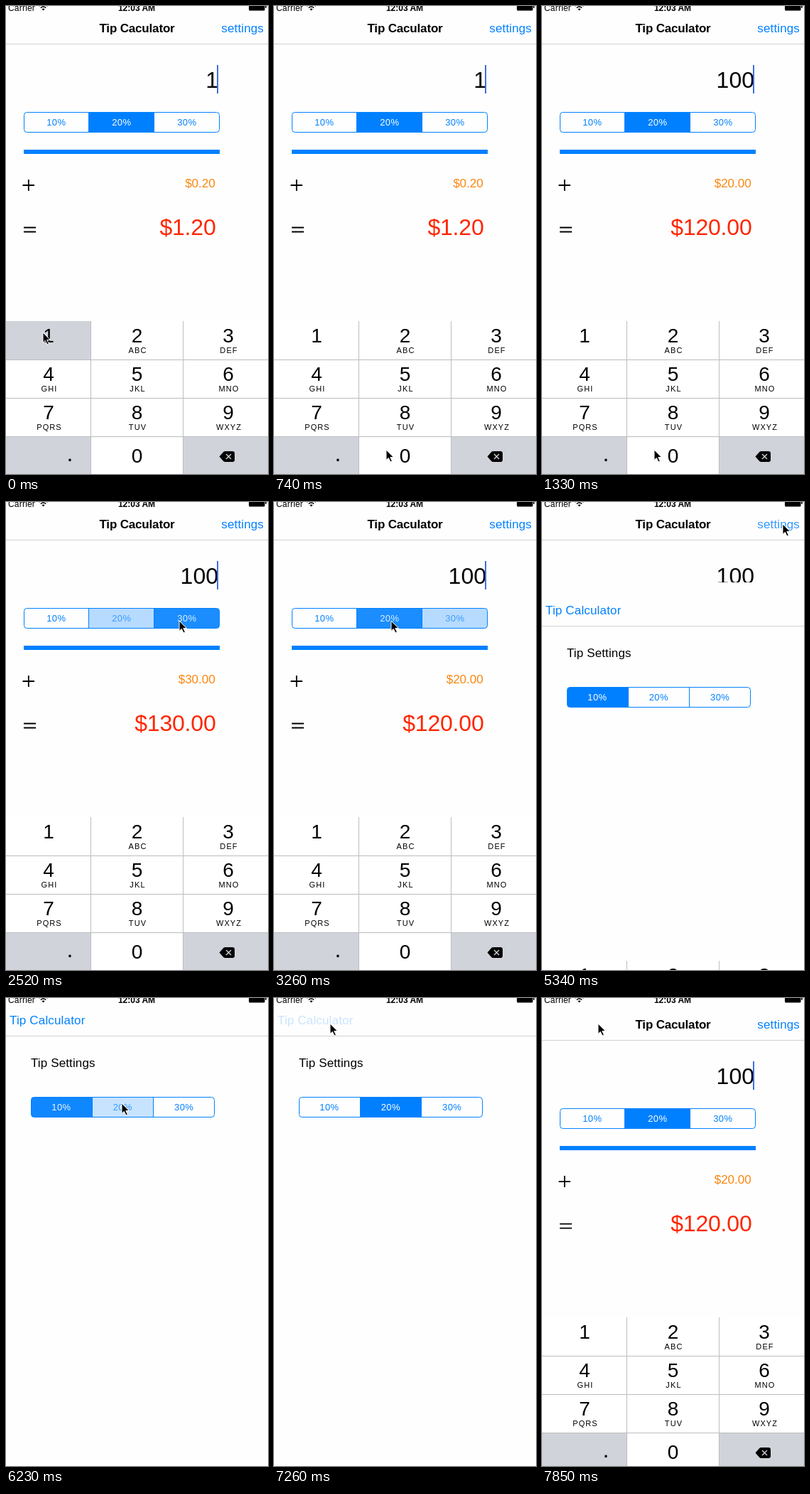
An HTML page that plays this animation: 369 by 658 pixels, repeating every 8 s.

```html
<!DOCTYPE html>
<html lang="en">
<head>
<meta charset="utf-8">
<title>Tip calculator</title>
<style>
html, body { margin: 0; width: 100%; height: 100%; overflow: hidden; background: #fefefe; }
svg { display: block; width: 369px; height: 658px; font-family: "Liberation Sans", Arial, sans-serif; }
text { white-space: pre; }
</style>
</head>
<body>
<svg id="stage" viewBox="0 0 369 658"></svg>
<script>
const LOOP = 8000, STEPS = 54;
const BLUE = '#0080ff', GRAY = '#d0d3da', PAPER = '#fefefe';
const stage = document.getElementById('stage');

function set(node, attrs) {
  for (const name in attrs) node.setAttribute(name, attrs[name]);
}
function el(parent, tag, attrs = {}, content) {
  const node = document.createElementNS('http://www.w3.org/2000/svg', tag);
  set(node, attrs);
  if (content !== undefined) node.textContent = content;
  parent.append(node);
  return node;
}
const group = parent => el(parent, 'g');
const rect = (parent, x, y, width, height, fill, more) =>
  el(parent, 'rect', { x, y, width, height, fill, ...more });
const path = (parent, d, more) => el(parent, 'path', { d, fill: 'none', ...more });
const text = (parent, x, y, size, content, more) =>
  el(parent, 'text', { x, y, 'font-size': size, ...more }, content);
const MID = { 'text-anchor': 'middle' }, END = { 'text-anchor': 'end' };
const shift = (node, x, y) => set(node, { transform: `translate(${x.toFixed(2)} ${y.toFixed(2)})` });

// Segmented control; the returned function takes the fill strength of each part.
function segments(parent, id, x, y, width) {
  const box = { x: x + .5, y: y + .5, width: width - 1, height: 28, rx: 4 };
  el(el(parent, 'clipPath', { id }), 'rect', box);
  const fills = el(parent, 'g', { 'clip-path': `url(#${id})` });
  const edge = i => x + Math.floor(width * i / 3 - .3 * (i % 3 > 0));
  const parts = ['10%', '20%', '30%'].map((label, i) => [
    rect(fills, edge(i), y, edge(i + 1) - edge(i) + .5, 29, BLUE),
    text(parent, x + width * (i + .5) / 3 - .2, y + 18.7, 13, label, { ...MID, 'letter-spacing': .4 })
  ]);
  el(parent, 'rect', { ...box, fill: 'none', stroke: BLUE });
  path(parent, `M${edge(1) + .5} ${y}v29M${edge(2) + .5} ${y}v29`, { stroke: BLUE });
  return levelOf => parts.forEach(([fill, label], i) => {
    const a = levelOf(i);
    set(fill, { opacity: a });
    set(label, { fill: a > .5 ? '#fff' : BLUE, opacity: 1 - 1.6 * a * (1 - a) });
  });
}

function backdrop(parent) {
  rect(parent, 0, -8, 369, 674, PAPER);
  rect(parent, 0, 53, 369, 1, '#d2d2d2');
}

// Calculator view
const main = group(stage);
backdrop(main);
text(main, 184.5, 37, 17, 'Tip Caculator', { ...MID, 'font-weight': 700, 'letter-spacing': -.17 });
const settingsLink = text(main, 303.3, 37, 17, 'settings', { fill: BLUE, 'letter-spacing': .14 });
const bill = text(main, 299, 115, 32, '', END);
const caret = rect(main, 297, 83, 2, 40, '#3f6fdc');
const paintTip = segments(main, 'tipClip', 25, 149, 276);
rect(main, 25, 202, 276, 6, BLUE);
path(main, 'M23.5 252h16.5M31.8 244v16M25 311.5h17M25 317.5h17', { stroke: '#000', 'stroke-width': 1.8 });
const tip = text(main, 294.7, 255, 17, '', { ...END, fill: '#fb850c' });
const total = text(main, 295.5, 322, 32, '', { ...END, fill: '#ff2600', 'letter-spacing': -.2 });

// Settings view
const prefs = group(stage);
backdrop(prefs);
const backLink = text(prefs, 5, 37, 17, 'Tip Calculator', { fill: BLUE, 'letter-spacing': .16 });
text(prefs, 35, 97, 17, 'Tip Settings', { 'letter-spacing': .12 });
const paintPrefs = segments(prefs, 'prefsClip', 35, 139, 259);

// Keypad
const pad = group(stage);
rect(pad, 0, 443, 369, 216, '#fff');
rect(pad, 0, 605, 119, 54, GRAY);
rect(pad, 250, 605, 119, 54, GRAY);
const keyOne = rect(pad, 0, 443, 119, 54, GRAY);
const keyZero = rect(pad, 120, 605, 129, 54, GRAY);
path(pad, 'M119.5 443v216M249.5 443v216M0 497.5h369M0 551.5h369M0 605.5h369', { stroke: '#bcbdc0' });
['', 'ABC', 'DEF', 'GHI', 'JKL', 'MNO', 'PQRS', 'TUV', 'WXYZ'].forEach((letters, i) => {
  const x = 60 + 126.5 * (i % 3) - (i % 3 === 1 ? 2 : 0), y = 472.7 + 54 * Math.floor(i / 3);
  text(pad, x, y, 28, i + 1, MID);
  text(pad, x + 1, y + 15, 11, letters, { ...MID, 'letter-spacing': 1.1 });
});
text(pad, 184.5, 642, 28, '0', MID);
text(pad, 90, 639.5, 32, '.', MID);
path(pad, 'M300.5 633.5L306 627.2Q307 626 309 626H319Q322 626 322 629V638Q322 641 319 641H309Q307 641 306 639.8Z', { fill: '#000' });
path(pad, 'M310 630l7 7M317 630l-7 7', { stroke: GRAY, 'stroke-width': 1.4 });

// Status bar
const status = group(stage);
text(status, 3, 6.5, 12, 'Carrier', { 'letter-spacing': .2 });
text(status, 184, 6.5, 12, '12:03 AM', { ...MID, 'font-weight': 700 });
path(status, 'M46.5 .2Q52.5 -4.5 58.5 .2M48.8 2.6Q52.5 -.4 56.2 2.6', { stroke: '#000', 'stroke-width': 1.5 });
path(status, 'M50.4 4.2Q52.5 2.6 54.6 4.2L52.5 6.5Z', { fill: '#000' });
rect(status, 342, -4, 22.5, 10.5, '#000', { rx: 1.5 });
rect(status, 365.2, -1, 1.6, 4, '#000', { rx: .8 });

const pointer = path(stage, 'M0 0V14.4L3.3 11.4L6 17L8.4 15.9L5.8 10.5H10.4Z',
  { fill: '#000', stroke: '#fff', 'stroke-linejoin': 'round' });

// What the user does; times are in steps of the loop.
const moves = [
  { from: 1, to: 5, x: 158, y: 624 },
  { from: 10, to: 16, x: 244, y: 167 },
  { from: 18, to: 20, x: 165, y: 167 },
  { from: 22, to: 25, x: 79, y: 167 },
  { from: 29, to: 33, x: 339, y: 31 },
  { from: 36, to: 41, x: 163, y: 148 },
  { from: 44, to: 48, x: 79, y: 36 }
];
const tipTaps = [{ at: -9, pick: 1 }, { at: 16, pick: 2 }, { at: 21, pick: 1 }, { at: 27, pick: 0 }];
const prefTaps = [{ at: -9, pick: 0 }, { at: 42, pick: 1 }];
const zeroTaps = [6, 8];
const RETURN = 51;

function ease(p) {
  p = Math.min(1, Math.max(0, p));
  return p * p * (3 - 2 * p);
}

function pointerAt(k) {
  let x = 52, y = 459;
  for (const m of moves) {
    const p = ease((k - m.from) / (m.to - m.from));
    x += (m.x - x) * p;
    y += (m.y - y) * p;
  }
  return [x, y];
}

const lastTap = (taps, k) => taps.filter(tap => tap.at <= k).pop();

// Cross-fade between choices: the old one leaves a little after the new one appears.
function levels(taps, k) {
  const now = lastTap(taps, k), before = lastTap(taps, now.at - 1), age = k - now.at;
  return i => i === now.pick ? ease((age + .6) / 2)
    : before && i === before.pick ? 1 - ease((age + .3) / 2) : 0;
}

// A link dims while pressed and recovers after release.
const linkOpacity = (k, press, release) =>
  k < press ? 1 : Math.min(1, .2 + .3 * Math.max(0, k - release));

// Share of a spring slide still to go, t seconds after its start
function remaining(t) {
  const w = 18.26 * Math.max(0, t);
  return (1 + w) * Math.exp(-w);
}

function draw(k) {
  const t = k * LOOP / STEPS / 1000;
  const returning = k >= RETURN;

  const amount = 10 ** zeroTaps.filter(at => at <= k).length;
  const pick = returning ? 1 : lastTap(tipTaps, k).pick;
  const extra = amount * (pick + 1) / 10;
  bill.textContent = amount;
  tip.textContent = '$' + extra.toFixed(2);
  total.textContent = '$' + (amount + extra).toFixed(2);
  paintTip(returning ? i => +(i === pick) : levels(tipTaps, k));
  paintPrefs(levels(prefTaps, k));

  const blinkOn = t < 1.18 || (t - 1.18) % 1 < .55;
  set(caret, { opacity: +(returning || (k < 35 && blinkOn)) });
  set(settingsLink, { opacity: linkOpacity(k, 34, 34) });
  set(backLink, { opacity: linkOpacity(k, 49, 50) });
  set(keyOne, { opacity: +(k === 0) });
  set(keyZero, { opacity: +zeroTaps.includes(k) });

  const mainY = returning ? 666 * remaining(t - 7.4822) : 0;
  shift(main, 0, mainY);
  shift(prefs, 0, 666 * remaining(t - 5.1624));
  shift(pad, 0, returning ? mainY : 217 * (1 - remaining(t - 5.0951)));
  stage.insertBefore(returning ? main : prefs, pad);

  shift(pointer, ...pointerAt(k));
}

// The small lead keeps each step from starting late through rounding.
let last = -1;
function tick() {
  const k = Math.floor((performance.now() + 6) % LOOP * STEPS / LOOP);
  if (k !== last) draw(last = k);
  requestAnimationFrame(tick);
}
tick();
</script>
</body>
</html>
```
